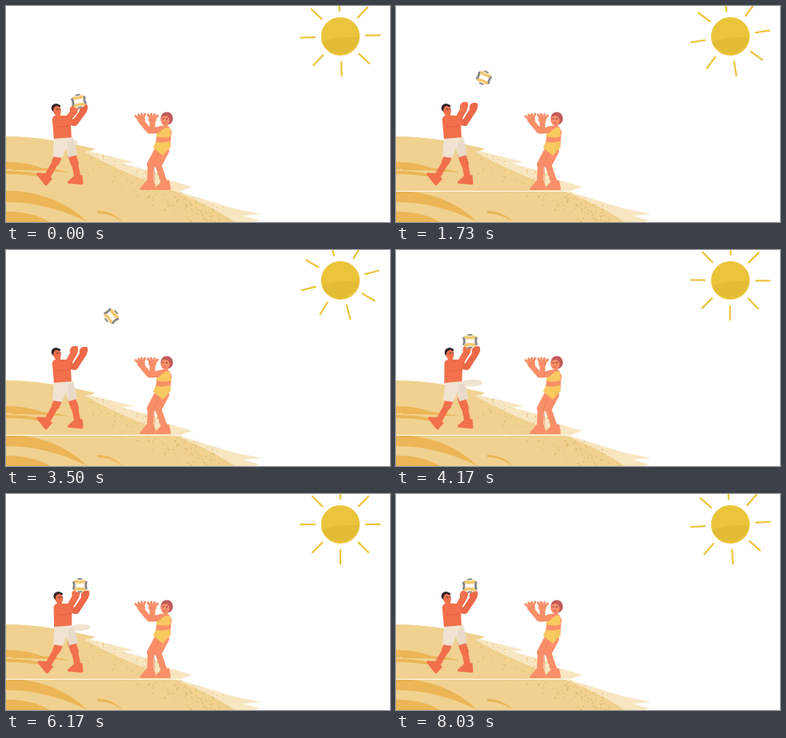
Animation, 480 px wide and 270 px high, one loop 8110 ms. Source, as an HTML page with a canvas:

```html
<!DOCTYPE html>
<html lang="en">
<head>
<meta charset="utf-8">
<title>Beach volleyball</title>
<style>
html, body { margin: 0; width: 100%; height: 100%; overflow: hidden; background: #fff; }
canvas { display: block; width: 100vw; height: 100vh; }
</style>
</head>
<body>
<canvas id="stage" width="480" height="270"></canvas>
<script>
const ctx = document.getElementById('stage').getContext('2d');
const LOOP = 8110, RALLY = LOOP / 4;
const MAN = '#f2704b', MAN_DARK = '#d9553a', WOMAN = '#f98f69', WOMAN_DARK = '#e97557';
const SHORTS = '#f0e3d2', YELLOW = '#f8c95f', SUN = '#ebc43b';
const SAND = '#f0d190', PALE = '#f8e6c1', DUNE = '#ecb555';

const mix = (a, b, u) => a + (b - a) * u;
const ramp = (p, from, to) => Math.min(1, Math.max(0, (p - from) / (to - from)));
const step = (p, from, to) => {
  const u = ramp(p, from, to);
  return u * u * (3 - 2 * u);
};
// A soft dip around a phase, wrapping from 1 to 0.
const pulse = (p, mid, width) => {
  const d = Math.abs(p - mid);
  return 1 - step(Math.min(d, 1 - d), 0, width);
};

function fill(path, color) {
  ctx.fillStyle = color;
  ctx.fill(new Path2D(path));
}

function line(path, color, width) {
  ctx.strokeStyle = color;
  ctx.lineWidth = width;
  ctx.stroke(new Path2D(path));
}

function oval(x, y, rx, ry, color, angle = 0) {
  ctx.fillStyle = color;
  ctx.beginPath();
  ctx.ellipse(x, y, rx, ry, angle, 0, 7);
  ctx.fill();
}

function place(x, y, angle, draw) {
  ctx.save();
  ctx.translate(x, y);
  ctx.rotate(angle);
  draw();
  ctx.restore();
}

// Moves the shoulders (35 px above the hip) sideways by dx.
function lean(dx, hip, draw) {
  const k = dx / 35;
  ctx.save();
  ctx.transform(1, 0, -k, 1, k * hip, 0);
  draw();
  ctx.restore();
}

function leg(hip, knee, x, y, color, angle = 0) {
  line(`M${hip}L${knee}`, color, 10);
  line(`M${knee}L${x} ${y}`, color, 8);
  place(x, y, angle, () => fill('M-4-6H5L7 4Q7 6 4 6H-12Q-14 4-10 1Z', color));
}

let seed = 7;
const random = () => (seed = seed * 16807 % 2147483647) / 2147483647;
const grains = Array.from({ length: 190 }, () => {
  const along = random();
  return [100 + along * 180, 190 + along * 84 + (random() + random() - 1) * 25, .4 + random() * .5];
});

function dune(x, y, w, h, thick) {
  fill(`M${x} ${y}q${w * .6} 0 ${w} ${h}q${-w * .5} ${thick - h} ${-w} ${thick - h}Z`, DUNE);
}

function drawBeach(showLine) {
  const pale = 'M80 172L111 178 106 182 160 195 145 197 196 210 188 213 233 226 216 232 284 253 319 260 296 262 317 268 310 270H70Z';
  fill(pale, PALE);
  fill('M0 163Q50 163 112 179L98 182Q145 208 198 227T286 270H0Z', SAND);
  dune(0, 195, 45, 8, 9);
  dune(8, 201, 72, 7, 4);
  dune(0, 206, 62, 11, 4);
  dune(0, 231, 102, 39, 14);
  dune(0, 257, 55, 13, 14);
  dune(114, 256, 32, 14, 3);
  ctx.save();
  ctx.clip(new Path2D(pale));
  for (const [x, y, r] of grains) oval(x, y, r, r, '#dfb35f');
  ctx.restore();
  if (showLine) {
    ctx.fillStyle = '#fffdf4';
    ctx.fillRect(0, 231, 216, 1);
  }
}

function drawSun(turns) {
  for (let i = 0; i < 8; i++)
    place(418, 38, (turns + i) * Math.PI / 4 - .035, () => line('M32 0H49.5', SUN, 2.2));
  oval(418, 38, 24.2, 24, SUN);
  fill('M395 45Q416 37 441 39A24 24 0 0 1 395 45Z', '#e3bb34');
}

function drawBall(p) {
  const out = ramp(p, .057, .416), back = ramp(p, .55, .955);
  const u = out - back, rest = pulse(p, 0, .05);
  const x = 92.5 + 69.5 * u - 1.5 * rest;
  const y = 114 + 2 * u - 132 * u * (1 - u) + 5 * rest + 10 * pulse(p, .483, .067);
  const spin = -270 * out - 90 * back - 10 * rest;
  place(x, y, spin * Math.PI / 180, () => {
    oval(0, 0, 9.6, 9, '#f7e9cd');
    for (const side of [-1, 1]) {
      line(`M-6 ${5 * side}Q0 ${3 * side} 6 ${5 * side}`, '#f2c568', 3);
      line(`M${8 * side}-4Q${6 * side} 0 ${8 * side} 4`, '#82858b', 2.6);
      line(`M-2 ${8 * side}H2`, '#8d8d8d', 2);
    }
    line('M-4 0H4', '#fffdf8', 4);
  });
}

function manArm(x, elbow, handX, handY, color) {
  line(`M${x} 144L${elbow} ${handX} ${handY + 3}`, color, 8);
  oval(handX, handY, 5.5, 4.8, color, -.6);
  line(`M${handX} ${handY}l3-3`, color, 4);
}

function drawMan(p) {
  const push = step(p, 0, .1) - step(p, .34, .46), dip = pulse(p, 0, .05);
  const dx = 6 * push, s = dx * .7;

  place(dx / 2, 0, 0, () => leg('66 186', '62 195', 50, 216, MAN, .9));
  leg('82 186', '86 197', 90, 217, MAN, .1);

  // Loose cloth that drifts out of the shorts, then swings back.
  const out = Math.sqrt(ramp(p, 0, .353)), back = step(p, .353, .42);
  if (p < .45) oval(mix(mix(78, 117, out), 85, back), mix(172, 158, out),
    mix(mix(10, 21, out), 8, back), mix(5, 3, out), '#f1e3d1', mix(-.06, -1.5, back));

  manArm(76 + s, `${86 + s} 146`, 97 + 5 * push, 126 + 2 * dip - push, '#ec6848');
  lean(dx * .9, 170, () => {
    fill('M61 137H78Q82 139 81 147L82 167H60L58 144Q57 139 61 137Z', MAN);
    line('M62 150Q70 153 80 149', MAN_DARK, .6);
    line('M64 133L66 140', MAN, 6);
    oval(62, 127.5, 5.3, 5.2, '#33272c');
    oval(64, 131, 4.8, 6, MAN, -.15);
    line('M59 125Q63 122 67 125', '#33272c', 2.4);
    line('M63 129H65M67 129H68', '#51312d', 1);
  });
  place(dx / 3, 0, 0, () => {
    fill('M60 166L84 164 89 186 78 189 75 178 70 190 58 188Z', SHORTS);
    fill('M77 169L84 166 89 186 78 189Z', '#e8dac8');
  });
  const handX = 85 + 6 * push, handY = 125 + 4 * dip - 2 * push;
  manArm(75 + s, `${79 + s} 139`, handX, handY, MAN);
  line(`M${80 + s} 143L${handX + 4} ${handY + 4}`, MAN_DARK, .6);
}

function womanArm(x, elbowX, elbowY, handX, handY, tilt) {
  line(`M${x} 155L${elbowX} ${elbowY} ${handX} ${handY + 2}`, WOMAN, 7);
  place(handX, handY, tilt, () => {
    oval(0, 0, 5, 4.5, WOMAN);
    for (let i = -1.5; i < 2; i++) line(`M${i} 0L${i * 4} ${Math.abs(i) - 7}`, WOMAN, 3);
  });
}

function drawWoman(p) {
  const w = step(p, .18, .34) - step(p, .48, .7), s = -6 * w;

  leg('199 181', '190 198', 199, 224, WOMAN);
  leg('190 181', '181 198', 180, 224, WOMAN);
  line('M190 184L185 198 186 218', WOMAN_DARK, .6);

  lean(-10 * w, 176, () => {
    fill('M189 151Q196 148 204 151L207 157 205 177H186L188 165Z', WOMAN);
    line('M200 146L199 154', WOMAN, 6);
    fill('M188 155Q194 158 199 152H205L206 163Q197 166 188 163Z', YELLOW);
    fill('M187 170Q196 172 205 169L206 176 196 187 184 177Z', YELLOW);
    oval(201, 140.5, 7.7, 8, '#c35b5c');
    oval(199 + w, 143, 5.6, 6, WOMAN);
    line('M196 141H197M200 141H202', '#683631', 1);
    line('M197 146H200', '#c94e49', .8);
  });

  womanArm(190 + s, mix(183, 178, w), 156, mix(183, 176, w), mix(142, 145, w), .1);
  womanArm(190 + s, mix(179, 168, w), mix(156, 159, w), mix(169, 160, w), mix(142, 149, w), -.2);
  line(`M${189 + s} 158L${mix(180, 170, w)} 159`, WOMAN_DARK, .6);
}

function frame() {
  const t = performance.now() % LOOP, p = t % RALLY / RALLY;
  ctx.clearRect(0, 0, 480, 270);
  ctx.lineCap = ctx.lineJoin = 'round';
  drawSun(t / RALLY);
  drawBeach(t >= 70);
  drawMan(p);
  drawWoman(p);
  drawBall(p);
  requestAnimationFrame(frame);
}
frame();
</script>
</body>
</html>
```
